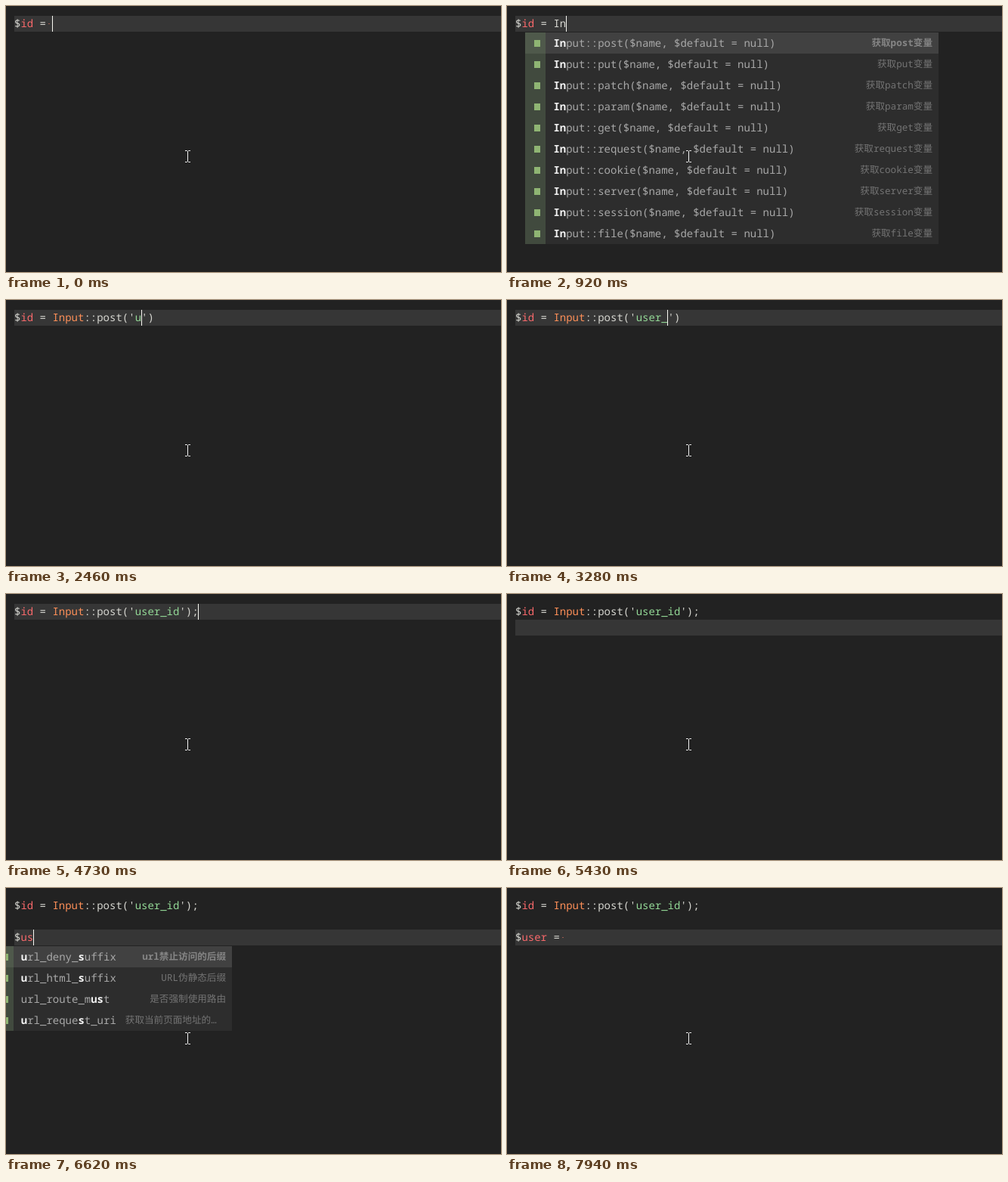
Write an HTML page that moves like this. It is 655 px wide and 352 px high and loops after 8000 ms.

```html
<!DOCTYPE html>
<html lang="en">
<head>
<meta charset="utf-8">
<title>Editor typing</title>
<style>
html, body { margin: 0; width: 100%; height: 100%; overflow: hidden; background: #222; }
svg { display: block; width: 655px; height: 352px; }
text { white-space: pre; text-rendering: geometricPrecision; fill: #d6d6d0; }
text, .latin { font-family: "Noto Sans Mono", "Liberation Mono", monospace; font-size: 14px; }
.var { fill: #f8696b; }
.cls { fill: #fd8f58; }
.str { fill: #93d896; }
.item { fill: #a8a8a8; }
.hit { fill: #f2f2f2; font-weight: 700; }
.hint { fill: #747474; font-family: "Noto Sans CJK SC", sans-serif; }
.hint, .hint .latin { font-size: 12.6px; }
.on { fill: #858585; font-weight: 700; }
</style>
</head>
<body>
<svg id="stage" viewBox="0 0 655 352"></svg>
<script>
const LOOP = 8000, LEFT = 11, TOP = 13, LINE = 21, CHAR = 8.4, ROW = 28, GUTTER = 27;
const stage = document.getElementById('stage');
const colX = col => LEFT + CHAR * col;
const rect = (x, y, w, h, fill, more = '') =>
  `<rect x="${x}" y="${y}" width="${w}" height="${h}" fill="${fill}" ${more}/>`;
const span = (cls, s) => `<tspan class="${cls}">${s}</tspan>`;

const methods = ['post', 'put', 'patch', 'param', 'get', 'request', 'cookie', 'server', 'session', 'file'];
const inputs = methods.map(m => [`Input::${m}($name, $default = null)`, `获取${m}变量`]);
const urls = [
  ['url_deny_suffix', 'url禁止访问的后缀'],
  ['url_html_suffix', 'URL伪静态后缀'],
  ['url_route_must', '是否强制使用路由'],
  ['url_request_uri', '获取当前页面地址的…'],
  ['url_route_on', '是否开启路由'],
  ['url_param_type', 'URL参数方式'],
  ['url_convert', '是否自动转换URL'],
  ['url_common_param', '普通方式参数'],
  ['url_domain_deploy', '域名部署'],
  ['url_domain_root', '域名根']
];
const classMenu = { x: 61.4, right: 571, y: 35, items: inputs, hits: () => [0, 1] };
const longMenu = { x: 19.8, right: 357, y: 77, items: urls, hits: () => [0] };
const shortMenu = {
  x: 19.8, right: 299, y: 77, items: urls.slice(0, 4),
  hits: s => s.includes('must') ? [11, 12] : [0, s.indexOf('s')]
};

const call = s => `$id = Input::post(${s})`;
const done = call("'user_id'") + ';';
const first = (at, text, caret, more) => ({ at, lines: [text], row: 0, caret, ...more });
const third = (at, text, caret = text.length, menu) => ({ at, lines: [done, '', text], row: 2, caret, menu });
const typed = (at, s) => first(at, call(`'${s}'`), 19 + s.length);

const steps = [
  first(0, '$id = ', 6),
  first(150, '$id = ', null),
  first(520, '$id = ', 6),
  first(640, '$id = I', 7),
  first(920, '$id = In', 8, { menu: classMenu }),
  first(1070, '$id = Inp', 9, { menu: { ...classMenu, hits: () => [0, 1, 2] } }),
  first(1190, call('$name'), null, { pick: 18 }),
  first(2060, call("'$name'"), null, { pick: 19 }),
  typed(2460, 'u'),
  typed(2580, 'us'),
  typed(2700, 'use'),
  typed(2850, 'user'),
  typed(3280, 'user_'),
  typed(3560, 'user_i'),
  typed(3810, 'user_id'),
  first(4240, call("'user_id'"), 27),
  first(4360, call("'user_id'"), 28, { pair: [17, 27] }),
  first(4610, done, 29, { pair: [17, 27] }),
  first(4730, done, 29),
  { at: 5000, lines: [done], row: 1, caret: 0 },
  { at: 5430, lines: [done], row: 1, caret: null },
  third(5740, ''),
  third(6200, '$'),
  third(6320, '$u'),
  third(6470, '$u', 2, longMenu),
  third(6620, '$us', 3, shortMenu),
  third(6740, '$user'),
  third(6890, '$user '),
  third(7170, '$user ='),
  third(7540, '$user = '),
  third(7940, '$user = ', null)
];

function colour(s) {
  return s.replace(/'([^']*)'|\$(\w+)|(\w+)(?=::)/g, (all, str, name, cls) =>
    str !== undefined ? `'${span('str', str)}'` : name ? '$' + span('var', name) : span('cls', cls));
}

function drawMenu({ x, right, y, items, hits }) {
  const left = Math.round(x - 37.2), edge = left + GUTTER;
  const height = items.length * ROW;
  let out = rect(left, y, right - left, height, '#2d2d2d') + rect(edge, y, right - edge, ROW, '#414141') +
    rect(left, y, GUTTER, height, '#414a3e') + rect(left, y, GUTTER, ROW, '#4f594b');
  items.forEach(([name, hint], i) => {
    const top = y + i * ROW, marks = hits(name);
    const label = [...name].map((c, n) => marks.includes(n) ? span('hit', c) : c).join('');
    const note = hint.replace(/[a-z]+|…/gi, s => span('latin', s));
    const cut = hint.endsWith('…');
    const noteX = cut ? x + name.length * CHAR + 12 : right - 8;
    out += rect(left + 12, top + 10, 8, 9, '#8fb573') +
      `<text class="item" x="${x}" y="${top + 19}">${label}</text>` +
      `<text class="hint${i ? '' : ' on'}" x="${noteX}" y="${top + 18}" text-anchor="${cut ? 'start' : 'end'}">${note}</text>`;
  });
  return out;
}

function draw({ lines, row, caret, pick, pair, menu }) {
  const y = TOP + row * LINE, text = lines[row] || '';
  let out = rect(0, 0, 655, 352, '#222') + rect(LEFT, y, 644, LINE, '#363636');
  if (pick) out += rect(Math.floor(colX(pick)) + .5, y + .5, 41, LINE - 2, '#505050', 'rx="2.5" stroke="#c8c8c8"');
  lines.forEach((s, i) => out += `<text x="${LEFT}" y="${TOP + 15 + i * LINE}">${colour(s)}</text>`);
  if (text.endsWith(' ')) out += rect(Math.floor(colX(text.length - .5)) - 1, y + 10, 2, 1, '#9a5a50');
  for (const col of pair || []) out += rect(Math.floor(colX(col)), y + 18, 8, 1, '#c8c8c8');
  if (caret !== null) out += rect(Math.floor(colX(caret)), y, 1, LINE, '#f8f8f2');
  if (menu) out += drawMenu(menu);
  // I-beam pointer
  out += '<path d="M237 191.5h2.5l1 1l1-1h2.5M240.5 192v14M237 206.5h2.5l1-1l1 1h2.5" fill="none" stroke="#f4f4f4"/>';
  stage.innerHTML = out;
}

let shown;
const start = performance.now();
function tick() {
  const t = (performance.now() - start) % LOOP;
  const step = steps.findLast(s => s.at <= t) || steps[0];
  if (step !== shown) draw(shown = step);
  requestAnimationFrame(tick);
}
tick();
</script>
</body>
</html>
```
